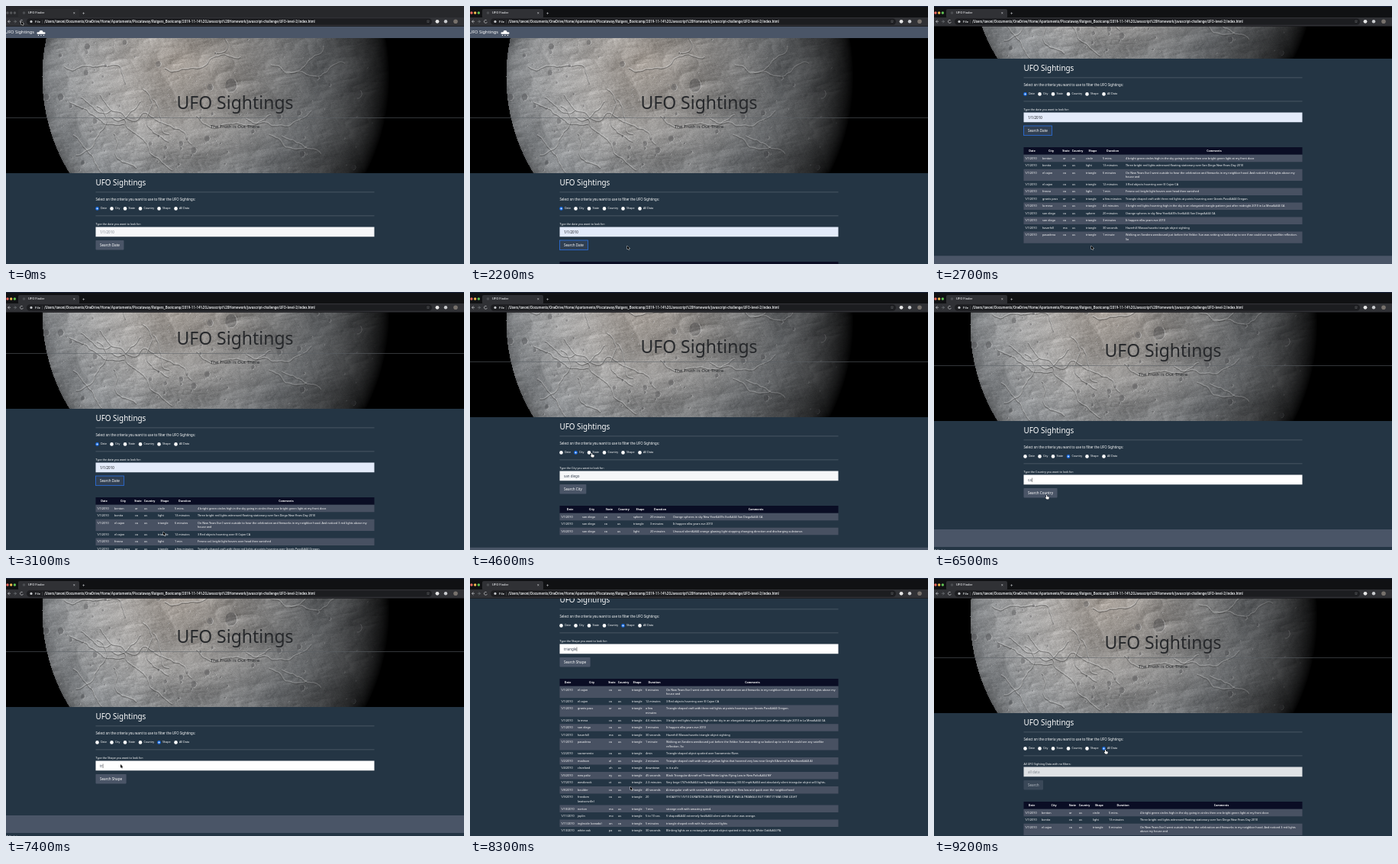
Write an HTML page with a canvas that moves like this. It is 600 px wide and 338 px high and loops after 9300 ms.

```html
<!DOCTYPE html>
<html lang="en">
<head>
<meta charset="utf-8">
<title>UFO Finder</title>
<style>
html, body { margin: 0; width: 100%; height: 100%; overflow: hidden; background: #243544; }
canvas { display: block; }
</style>
</head>
<body>
<canvas id="stage" width="600" height="338"></canvas>
<script>
const LOOP = 9300, STEP = 100;
const PAGE = '#243544', SLATE = '#4a5567', INK = '#0a0d24';
const SANS = '"Noto Sans", sans-serif', UI = 'Roboto, sans-serif';
const ctx = document.getElementById('stage').getContext('2d');

// One entry per search: when it is picked, typed and run, and the table's column edges.
const searches = [
  { name: 'Date', value: '1/1/2010', pick: 0, type: 1400, run: 1800, field: 0, dot: 119.5,
    label: 'Type the date you want to look for:', cols: [119, 142, 169, 181, 199, 221, 251] },
  { name: 'City', value: 'san diego', pick: 3500, type: 3600, run: 4200, field: 1, dot: 138.5,
    cols: [119, 147, 176, 193, 214, 236, 266] },
  { name: 'State', value: 'ca', pick: 4700, type: 4900, run: 5200, field: 2, dot: 156 },
  { name: 'Country', value: 'ca', pick: 6000, type: 6200, run: 6600, field: 3, dot: 176 },
  { name: 'Shape', value: 'triangle', pick: 7200, type: 7300, run: 7700, field: 4, dot: 200.5 },
  { name: 'All Data', value: 'all data', pick: 9000, type: LOOP, run: 9000, dot: 222.5,
    label: 'All UFO Sighting Data with no filters:', cols: [119, 141, 177, 190, 208, 229, 270] }
];
const defaultCols = [119, 141, 182, 194, 212, 230, 257];
const headings = ['Date', 'City', 'State', 'Country', 'Shape', 'Duration', 'Comments'];

const sightings = `1/1/2010|benton|ar|us|circle|5 mins.|4 bright green circles high in the sky going in circles then one bright green light at my front door.
1/1/2010|bonita|ca|us|light|13 minutes|Three bright red lights witnessed floating stationary over San Diego New Years Day 2010
1/1/2010|el cajon|ca|us|triangle|6 minutes|On New Years Eve I went outside to hear the celebration and fireworks in my neighbor hood. And noticed 3 red lights above my house and
1/1/2010|el cajon|ca|us|triangle|12 minutes|3 Red objects hovering over El Cajon CA
1/1/2010|fresno|ca|us|light|1 min|Fresno cal. bright light hovers over head then vanished
1/1/2010|grants pass|or|us|triangle|a few minutes|Triangle shaped craft with three red lights at points hovering over Grants Pass&#44 Oregon.
1/1/2010|la mesa|ca|us|triangle|4-6 minutes|3 bright red lights hovering high in the sky in an elongated triangle pattern just after midnight 2010 in La Mesa&#44 CA
1/1/2010|san diego|ca|us|sphere|20 minutes|Orange spheres in sky New Year&#39s Eve&#44 San Diego&#44 CA
1/1/2010|san diego|ca|us|triangle|3 minutes|It happen nEw years eve 2010
1/1/2010|haverhill|ma|us|triangle|30 seconds|Haverhill Massachusetts triangle object sighting
1/1/2010|pasadena|ca|us|triangle|1 minute|Walking on Sandera westbound just before the Veldor. Sun was setting so looked up to see if we could see any satellite reflection. So
1/2/2010|sacramento|ca|us|triangle|4min|Triangle shaped object spotted over Sacramento River.
1/2/2010|madison|al|us|triangle|2 minutes|Triangle shaped craft with orange-yellow lights that hovered very low near Greyfell Arsenal in Madison&#44 Al
1/4/2010|cleveland|oh|us|triangle|downtown|is it a ufo
1/5/2010|new paltz|ny|us|triangle|45 seconds|Black Triangular Aircraft w/ Three White Lights Flying Low in New Paltz&#44 NY
1/6/2010|san diego|ca|us|light|20 minutes|Unusual silent&#44 orange glowing light stopping changing direction and discharging substance.
1/7/2010|westbrook|ct|us|triangle|2-3 minutes|Very large (747ish)&#44 low flying&#44 slow moving (30-50 mph)&#44 and absolutely silent triangular object w/3 lights.
1/8/2010|boulder|ca|us|triangle|40 seconds|A triangular craft with several&#44 large bright lights flew low and quick over the neighborhood
1/9/2010|freedom (watsonville)|ca|us|triangle|20|((HOAX??)) 1/9/10 DURATION 20:00 FREEDOM CA IT WAS A TRIANGLE BUT FIRST IT WAS ONE LIGHT
1/10/2010|norton|ma|us|triangle|1 min|strange craft with amazing speed.
1/11/2010|joplin|mo|us|triangle|5 to 10 sec.|V shaped&#44 extremely fast&#44 silent and the color was orange.
1/11/2010|ingleside (canada)|on|ca|triangle|5 minutes|triangle shaped craft with four coloured lights
1/13/2010|white oak|pa|us|triangle|30 seconds|Blinking lights on a rectangular shaped object spotted in the sky in White Oak&#44 PA.`
  .split('\n').map(line => line.split('|'));

const scrollKeys = [[0, 0], [2200, 0], [2600, 150], [2800, 150], [3100, 66], [3300, 55], [4600, 55],
  [4800, 50], [5300, 50], [5500, 140], [5700, 140], [5900, 50], [7800, 50], [8300, 203],
  [8500, 260], [8600, 260], [8900, 42]];
const mouseKeys = [[0, 20, 20], [400, 20, 20], [900, 180, 294], [1400, 180, 294], [1700, 140, 312],
  [1800, 140, 312], [2100, 206, 314], [3200, 206, 314], [3400, 138, 209], [3500, 138, 209],
  [3700, 150, 239], [4000, 150, 239], [4200, 140, 257], [4300, 140, 257], [4600, 159, 211],
  [4700, 159, 211], [4900, 150, 244], [5000, 150, 244], [5200, 140, 262], [5700, 140, 262],
  [5900, 175, 214], [6000, 175, 214], [6200, 150, 244], [6300, 150, 244], [6500, 147, 266],
  [6700, 147, 266], [7000, 200, 214], [7200, 200, 214], [7400, 150, 244], [7600, 150, 244],
  [7900, 210, 273], [8700, 210, 273], [9000, 224, 225]];

function track(keys, t) {
  const i = keys.findIndex(k => k[0] > t);
  if (i < 0) return keys[keys.length - 1].slice(1);
  const [a, b] = [keys[i - 1], keys[i]];
  const p = (t - a[0]) / (b[0] - a[0]), e = p * p * (3 - 2 * p);
  return a.slice(1).map((v, j) => v + (b[j + 1] - v) * e);
}

function rect(x, y, w, h, color, r = 0) {
  ctx.fillStyle = color;
  ctx.beginPath();
  ctx.roundRect(x, y, w, h, r);
  ctx.fill();
}
function disc(x, y, r, color) { rect(x - r, y - r, 2 * r, 2 * r, color, r); }
function stroke(color, width, ...points) {
  ctx.strokeStyle = color;
  ctx.lineWidth = width;
  ctx.beginPath();
  points.forEach(p => ctx.lineTo(...p));
  ctx.stroke();
}
// Text is placed by the middle of its x-height.
function text(str, x, y, size, color = '#fff', weight = 400, family = SANS, align = 'left') {
  ctx.font = `${weight} ${size}px ${family}`;
  ctx.textAlign = align;
  ctx.fillStyle = color;
  ctx.fillText(str, x, y + size * 0.34);
}

function makeMoon() {
  const w = 600, h = 177, moon = new OffscreenCanvas(w, h), m = moon.getContext('2d');
  let seed = 11;
  const random = () => (seed = seed * 16807 % 2147483647) / 2147483647;
  const lattice = Array.from({ length: 4096 }, random);
  const at = (i, j) => lattice[(i * 73 + j * 601) & 4095];
  const noise = (x, y) => {
    const i = Math.floor(x), j = Math.floor(y);
    let u = x - i, v = y - j;
    u *= u * (3 - 2 * u);
    v *= v * (3 - 2 * v);
    const top = at(i, j) * (1 - u) + at(i + 1, j) * u;
    return top * (1 - v) + (at(i, j + 1) * (1 - u) + at(i + 1, j + 1) * u) * v;
  };
  const height = (x, y) => {
    let sum = 0, f = 1 / 70, amp = 20;
    for (let o = 0; o < 5; o++, f *= 2.1, amp /= 2.1)
      sum += amp * Math.abs(2 * noise((x - y * 0.5) * f + 9, (y * 1.5 + x * 0.3) * f + 40) - 1);
    return sum;
  };
  const light = (x, y) => {
    const nx = (x - 290) / 243, ny = (y - 50) / 243, d = nx * nx + ny * ny;
    return d > 1 ? 0 : Math.max(0, 0.8 * Math.sqrt(1 - d) - 0.45 * nx) ** 0.8;
  };
  const img = m.createImageData(w, h);
  for (let y = 0, k = 0; y < h; y++) for (let x = 0; x < w; x++, k += 4) {
    const lum = light(x, y);
    const slope = lum && height(x + 1, y + 0.6) - height(x - 1, y - 0.6);
    const v = lum * (170 + slope * 8 + 36 * (noise(x / 50, y / 40) - 0.5) + 16 * (noise(x, y) - 0.5));
    const warm = 8 * lum * Math.max(-0.5, 1 - Math.hypot(x - 230, y - 30) / 120);
    img.data.set([v + warm, v, v - warm, 255], k);
  }
  m.putImageData(img, 0, 0);

  // Scarps: wandering bright edges with a shadow below.
  for (let i = 0; i < 20; i++) {
    let x = 70 + random() * 300, y = 10 + random() * 120, angle = 0.2 + random() * 0.6;
    for (let n = 20 + random() * 30; n > 0; n--) {
      const x2 = x + 2.2 * Math.cos(angle), y2 = y + 2.2 * Math.sin(angle), lum = light(x2, y2);
      for (const [shift, tone] of [[1.4, 45], [0, 225]]) {
        m.strokeStyle = `rgba(${tone},${tone},${tone},${0.45 * lum})`;
        m.lineWidth = 1.2;
        m.beginPath();
        m.moveTo(x, y + shift);
        m.lineTo(x2, y2 + shift);
        m.stroke();
      }
      [x, y] = [x2, y2];
      angle += (random() - 0.52) * 0.9;
    }
  }

  const crater = (x, y, r) => {
    const lum = light(x, y);
    if (lum < 0.1) return;
    m.fillStyle = 'rgba(50,50,54,.28)';
    m.beginPath();
    m.ellipse(x, y, r * 0.85, r, 0, 0, 7);
    m.fill();
    m.strokeStyle = `rgba(230,230,230,${0.6 * lum})`;
    m.lineWidth = 0.9;
    m.beginPath();
    m.ellipse(x, y, r * 0.85, r, 0, -0.9, 1.8);
    m.stroke();
  };
  crater(461, 73, 6);
  crater(295, 62, 9);
  for (let i = 0; i < 130; i++) crater(50 + random() * 440, random() * h, 0.8 + 4 * random() ** 4);
  return moon;
}
const moon = makeMoon();

function drawBrowser(active) {
  rect(0, 0, 600, 15, active ? '#101113' : '#27282b');
  if (active) rect(0, 0, 600, 0.8, '#1c2a48');
  rect(0, 15, 600, 11.5, '#303135');
  rect(16, 4, 80, 12, active ? '#303135' : '#2c2d30', 2);
  ['#ee6a5f', '#f5bd4f', '#61c454'].forEach((c, i) => disc(2 + i * 4.7, 9, 1.7, active ? c : '#55575a'));
  disc(23.5, 9, 1.8, '#4c4e52');
  text('UFO Finder', 29, 9, 4.3, '#d5d7da', 500, UI);
  text('×', 88, 9, 5, '#c8cacd', 400, UI);
  text('+', 100, 9, 6, '#c8cacd', 400, UI);
  const grey = '#c4c6c9';
  stroke(grey, 0.7, [4.5, 18.5], [2.5, 20.3], [4.5, 22.2]);
  stroke(grey, 0.7, [2.5, 20.3], [6, 20.3]);
  stroke('#777a7e', 0.7, [11.5, 18.5], [13.5, 20.3], [11.5, 22.2]);
  stroke('#777a7e', 0.7, [10, 20.3], [13.5, 20.3]);
  ctx.strokeStyle = grey;
  ctx.beginPath();
  ctx.arc(20.5, 20.3, 2, 0.3, 5.4);
  ctx.stroke();
  rect(27, 16.3, 531, 8.4, '#1c1d20', 4.2);
  disc(33, 20.4, 1.6, grey);
  text('File', 38, 20.2, 4.4, '#e0e2e4', 500, UI);
  rect(47, 18, 0.5, 5, '#55575a');
  text('/Users/tavoni/Documents/OneDrive/Home/Apartamento/Piscataway/Rutgers_Bootcamp/2019-11-14%20Javascript%20Homework/javascript-challenge/UFO-level-2/index.html',
    50, 20.2, 4.5, '#f0f2f4', 500, UI);
  text('☆', 553, 20.2, 5.5, grey, 400, '"DejaVu Sans", sans-serif', 'center');
  disc(565, 20.3, 2.4, '#e6e6e6');
  disc(576, 20.3, 2.2, '#c9cbce');
  disc(589, 20.3, 2.8, '#77716c');
  rect(0, 26, 600, 0.7, '#18191b');
}

function drawHero() {
  rect(0, 27, 600, 15.5, SLATE);
  text('UFO Sightings', -1, 34.5, 5.7, '#fff', 500);
  rect(43.5, 32, 5, 4, '#fff', 2);
  rect(40.5, 34.2, 11, 2.6, '#fff', 1.3);
  [42.5, 46, 49.5].forEach(x => disc(x, 38.4, 0.6, '#fff'));
  ctx.drawImage(moon, 0, 42);
  text('UFO Sightings', 300, 127, 23, '#26282b', 400, SANS, 'center');
  rect(0, 146, 600, 0.8, 'rgba(92,97,103,.75)');
  text('The Truth is Out There', 300, 157.5, 6.15, '#202225', 400, SANS, 'center');
}

function drawForm(s, t) {
  const all = s.name === 'All Data', ran = t >= s.run, filled = s.name === 'Date' && t >= s.type;
  const focused = t >= s.type - 100 && (!ran || s.name === 'Shape');
  text('UFO Sightings', 117.5, 231.7, 9.9, '#fff', 500);
  [243.6, 274.6].forEach(y => rect(117.5, y, 365, 0.7, '#53616d'));
  text('Select on the criteria you want to use to filter the UFO Sightings:', 117.5, 254, 4.35, '#fff', 500);
  searches.forEach(o => {
    disc(o.dot, 265.4, 2.3, o === s ? '#1a6fe8' : '#fff');
    if (o === s) disc(o.dot, 265.4, 0.9, '#fff');
    text(o.name, o.dot + 4.4, 265, 3.65, '#fff', 500);
  });
  text(s.label || `Type the ${s.name} you want to look for:`, 117.5, 285.3, 3.65, '#fff', 500);

  rect(117.5, 289.5, 365, 12.7, all ? '#dfe2e5' : filled ? '#e3ebfa' : focused ? '#fff' : '#f6f7f9');
  const typed = filled ? s.value : s.value.slice(0, Math.max(0, Math.floor((t - s.type) / 50)));
  text(typed || s.value, 123, 296, 4.5, typed ? (filled ? '#14171b' : '#3c4656') : '#7d858d');
  if (focused) rect(123.3 + (typed ? ctx.measureText(typed).width : 0), 293.5, 0.5, 5.5, '#222');

  const caption = all ? 'Search' : `Search ${s.name}`, ring = filled && ran, weight = all ? 400 : 500;
  ctx.font = `${weight} 4.6px ${SANS}`;
  const w = ctx.measureText(caption).width + 11;
  rect(117.5, 307, w, 12.4, all ? '#3a4858' : ring ? '#303f52' : SLATE, 0.8);
  if (ring) {
    ctx.strokeStyle = '#2b6cd4';
    ctx.lineWidth = 0.9;
    ctx.strokeRect(117.5, 307, w, 12.4);
  }
  text(caption, 123, 313, 4.6, all ? '#b3bac2' : '#fff', weight);
}

function wrap(str, width) {
  return str.split(' ').reduce((lines, word) => {
    const last = lines.length - 1, longer = lines[last] ? `${lines[last]} ${word}` : word;
    if (lines[last] && ctx.measureText(longer).width > width) lines.push(word);
    else lines[last] = longer;
    return lines;
  }, ['']);
}

// Returns the page position where the footer begins.
function drawTable(s) {
  const rows = sightings.filter(r => s.field === undefined || r[s.field] === s.value);
  const cols = [...(s.cols || defaultCols), 485], size = 3.72;
  rect(117.5, 335, 365, 9.8, INK);
  headings.forEach((h, i) => {
    const mid = (cols[i] + cols[i + 1]) / 2 - (i < 6 ? 2 : 1);
    text(h, mid, 339.8, 3.6, '#fff', 700, SANS, 'center');
  });
  let y = 344.8;
  rows.forEach((row, n) => {
    ctx.font = `400 ${size}px ${SANS}`;
    const cells = row.map((c, i) => wrap(c, cols[i + 1] - cols[i] - 5));
    const h = 9.5 + 5.7 * (Math.max(...cells.map(c => c.length)) - 1);
    if (n % 2 === 0) rect(117.5, y, 365, h, '#485162');
    cells.forEach((lines, i) => lines.forEach((l, k) => text(l, cols[i], y + 4.7 + 5.7 * k, size)));
    y += h;
  });
  return y + 16.5;
}

function drawMouse(x, y, hand) {
  ctx.save();
  ctx.translate(x, y);
  ctx.lineJoin = 'round';
  ctx.lineWidth = 0.7;
  const shape = new Path2D(hand
    ? 'M0 .3Q.6-.5 1.1.3V2L3.4 2.5Q4 2.8 3.8 3.6L3.2 5.6H.5L-1.2 3.4Q-1 2.8 0 3.2Z'
    : 'M0 0V4.8L1.1 3.8L1.9 5.5L2.7 5.1L1.9 3.5H3.4Z');
  ctx.fillStyle = hand ? '#fff' : '#000';
  ctx.strokeStyle = hand ? '#111' : '#fff';
  ctx.stroke(shape);
  ctx.fill(shape);
  ctx.restore();
}

function draw(t) {
  const s = searches.findLast(o => t >= o.pick);
  const [scroll] = track(scrollKeys, t), [mx, my] = track(mouseKeys, t);
  rect(0, 0, 600, 338, PAGE);
  ctx.save();
  ctx.translate(0, -scroll);
  drawHero();
  drawForm(s, t);
  const foot = t >= s.run ? drawTable(s) : 361;
  rect(0, foot, 600, 23, SLATE);
  text('© Sightings', 0, foot + 27.5, 4);
  ctx.restore();
  drawBrowser(t >= 500);
  const pageY = my + scroll;
  const overRadio = Math.abs(pageY - 266) < 3, overButton = pageY > 307 && pageY < 320 && mx < 162;
  drawMouse(mx, my, my > 27 && (overRadio || overButton));
}

function tick() {
  draw(Math.floor(performance.now() % LOOP / STEP) * STEP);
  requestAnimationFrame(tick);
}
tick();
</script>
</body>
</html>
```
